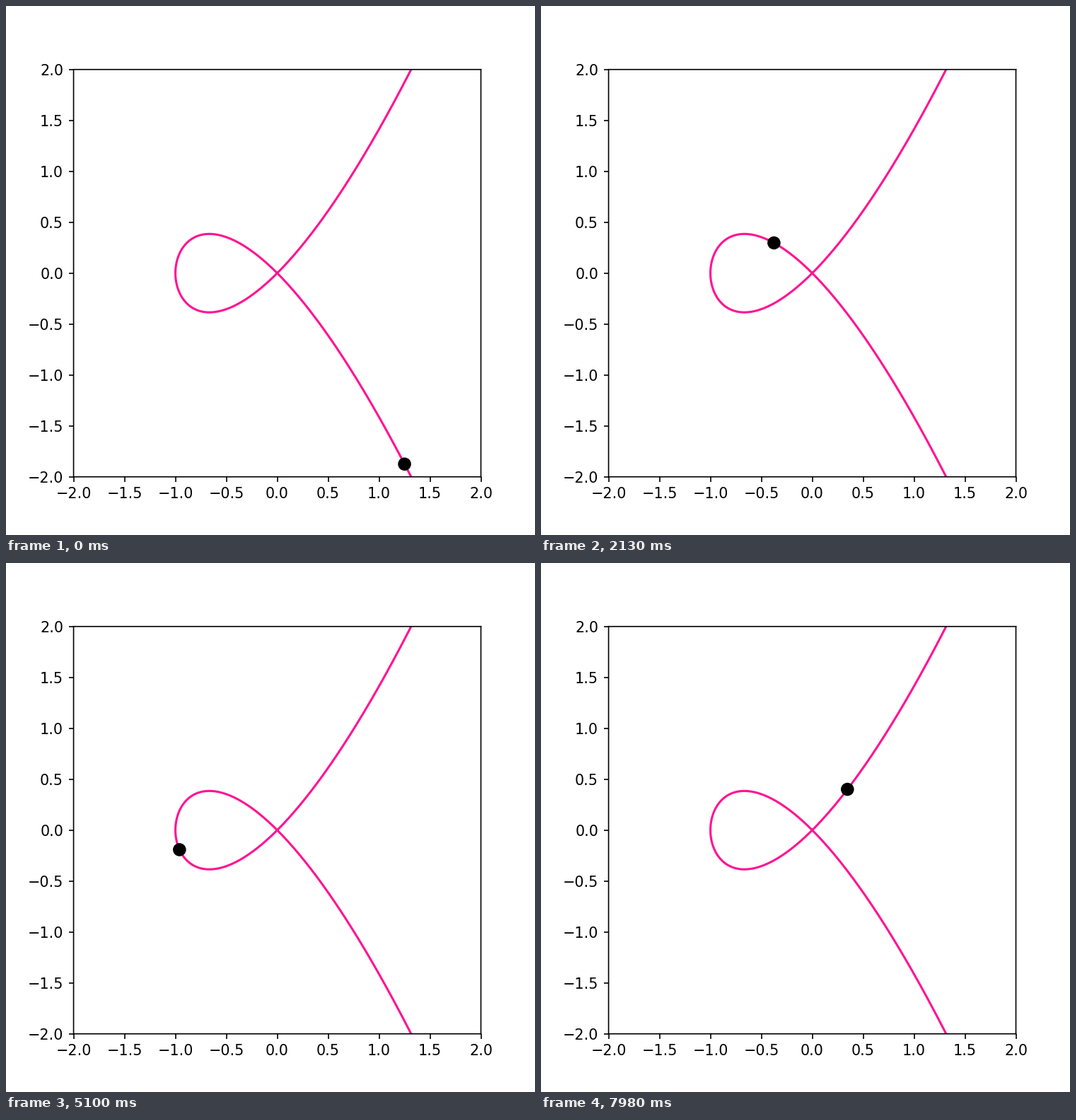
These frames come from a looping animation (748 by 748 pixels, 8 s). A matplotlib script:

```python
import numpy as np
import matplotlib.pyplot as plt
from matplotlib.animation import FuncAnimation
from matplotlib.patches import Circle

SIZE = 748
LOOP = 8000
FRAMES = 267
T0, DT = -1.5, 0.01

# Smooth sub-pixel placement of the frame and the dot
plt.rcParams["path.snap"] = False


def cubic(t):
    """Nodal cubic y^2 = x^3 + x^2, parametrised by the slope t."""
    x = t ** 2 - 1
    return x, t * x


fig, ax = plt.subplots(figsize=(5, 5), dpi=SIZE / 5)
fig.subplots_adjust(left=0.1255)
ax.set_aspect("equal")
ax.set(xlim=(-2, 2), ylim=(-2, 2))
ticks = np.arange(-2, 2.1, 0.5)
ax.set_xticks(ticks)
ax.set_yticks(ticks)

ax.plot(*cubic(np.linspace(-1.7, 1.7, 800)), color="deeppink", lw=1.5)
dot = ax.add_patch(Circle(cubic(T0), 0.0645, color="black", lw=0, zorder=3))


def update(i):
    dot.center = cubic(T0 + DT * i)
    return dot,


anim = FuncAnimation(fig, update, frames=FRAMES, interval=LOOP / FRAMES,
                     init_func=lambda: update(0), repeat=True, repeat_delay=0)
plt.show()
```
